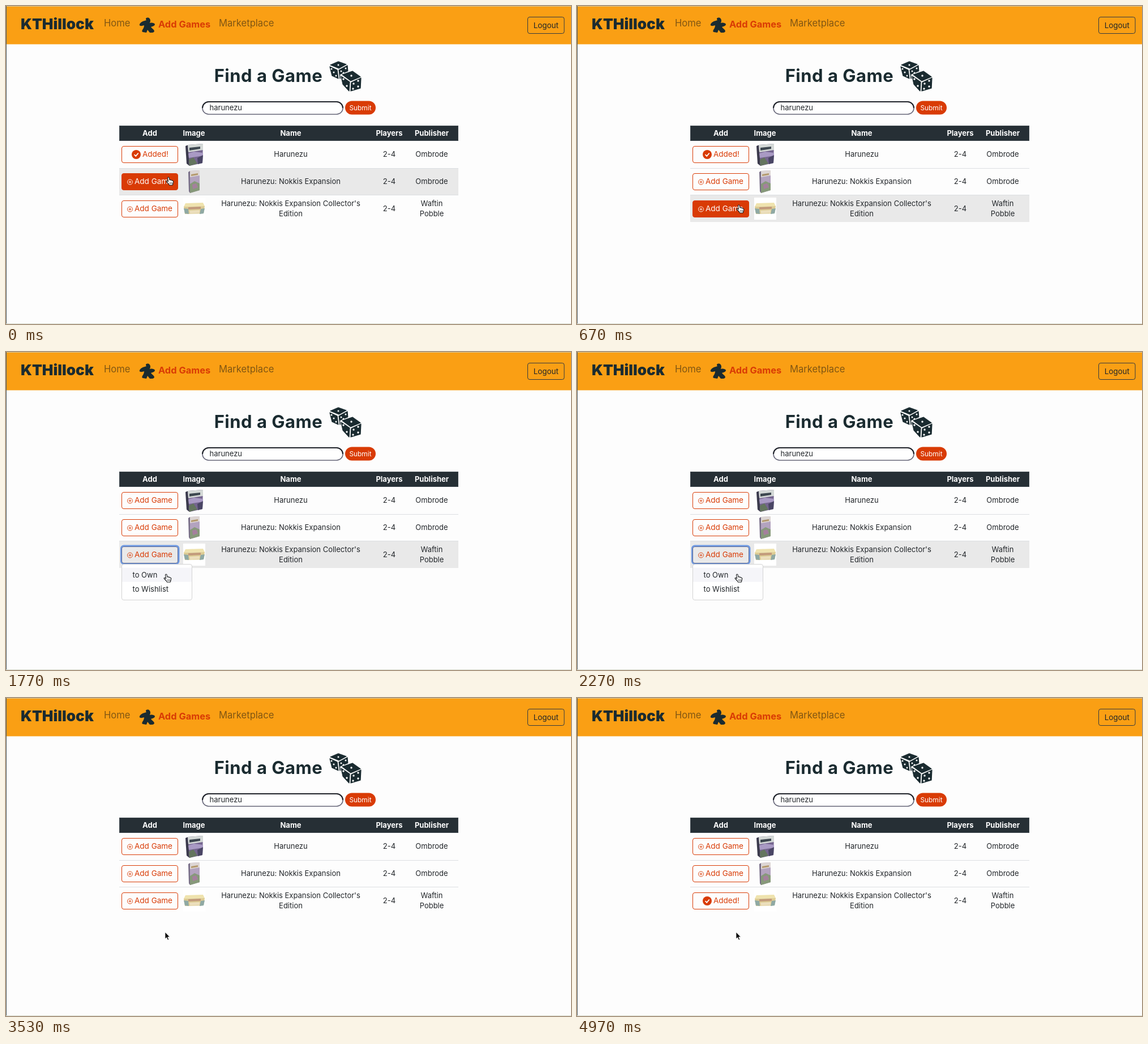
Animation, 998 px wide and 561 px high, one loop 5.01 s. Source, as an HTML page:

```html
<!DOCTYPE html>
<html lang="en">
<head>
<meta charset="utf-8">
<title>Find a Game</title>
<style>
  html, body { margin: 0; width: 100%; height: 100%; overflow: hidden; background: #fdfdfd; }
  svg { display: block; width: 998px; height: 561px; font: 13px Inter, sans-serif; fill: #212529; }
  .mid { text-anchor: middle; }
  .head { font-weight: 700; fill: #fff; }
  .nav { font-size: 16.6px; fill: #805613; }
</style>
</head>
<body>
<svg id="stage" viewBox="0 0 998 561" xmlns="http://www.w3.org/2000/svg"></svg>
<script>
const LOOP = 5010;
const RED = '#d93b05', DARK = '#1a2b30';
const stage = document.getElementById('stage');

const text = (x, y, s, attrs = '') => `<text x="${x}" y="${y}" ${attrs}>${s}</text>`;
const mid = (x, y, s, cls = '', attrs = '') => text(x, y, s, `class="mid ${cls}" ${attrs}`);
const rect = (x, y, w, h, attrs = '') =>
  `<rect x="${x}" y="${y}" width="${w}" height="${h}" ${attrs}/>`;
const path = (d, attrs = '') => `<path d="${d}" ${attrs}/>`;
const dots = (points, r) =>
  points.map(([x, y]) => `<circle cx="${x}" cy="${y}" r="${r}" fill="#fdfdfd"/>`).join('');

const rows = [
  { top: 238, bottom: 286, button: 247, name: ['Harunezu'], maker: ['Ombrode'] },
  { top: 287, bottom: 333, button: 295, name: ['Harunezu: Nokkis Expansion'], maker: ['Ombrode'] },
  { top: 334, bottom: 381, button: 343,
    name: ["Harunezu: Nokkis Expansion Collector's", 'Edition'], maker: ['Waftin', 'Pobble'] }
];

function navbar() {
  return rect(0, 0, 998, 67.5, 'fill="#fa9f14"') +
    text(26, 41, 'KTHillock', `font-size="26.2" font-weight="900" fill="${DARK}"`) +
    path('M247 22c3-3 8-1 8 4 0 2-1 3-1 4 4-1 8 0 9 2 0 3-4 4-7 5 2 3 5 4 6 7 0 2-2 3-4 3h-4l-4-5-2 5-6-1c-2 0-2-2-1-4 2-3 3-5 3-8-3 1-7 2-8 0-1-3 4-7 9-8l3-1c-1-1-1-2-1-3z', `fill="${DARK}"`) +
    text(269, 38, 'Add Games', `font-size="16.4" font-weight="700" fill="${RED}"`) +
    text(376, 36, 'Marketplace', 'class="nav"') +
    text(173, 36, 'Home', 'class="nav"') +
    rect(921.5, 19.5, 64.5, 29, 'rx="3.5" fill="none" stroke="#343a40"') +
    mid(953.8, 38.5, 'Logout', '', 'font-size="13.4"');
}

function dice() {
  const solid = `fill="${DARK}" stroke="${DARK}" stroke-width="1.2" stroke-linejoin="round"`;
  return path('M573 104l14-6 14 5-13 7zM572 107l13 6 2 15-11-5zM588 113l15-8 1 12-14 11z', solid) +
    dots([[587, 104], [575, 111], [579, 117], [583, 123], [592, 115], [600, 110], [596, 118]], 1.5) +
    path('M590 121l22-9 18 13-2 21-21 7-14-14z', 'fill="#fdfdfd"') +
    path('M594 121l18-6 14 10-17 7zM592 124l15 10-1 16-11-12zM610 135l17-8-1 18-17 5z', solid) +
    dots([[610, 123], [596, 129], [602, 141], [614, 137], [622, 132], [613, 146], [622, 142]], 1.7);
}

function search() {
  return mid(463.5, 133.5, 'Find a Game', '',
      `font-size="31" font-weight="700" letter-spacing=".5" fill="${DARK}"`) + dice() +
    rect(347, 169, 248, 22, 'rx="11" fill="#fff" stroke="#67677a" stroke-width="1.6"') +
    path('M347 180a11 11 0 0 1 11-11h226a11 11 0 0 1 11 11', 'fill="none" stroke="#20232a" stroke-width="2"') +
    text(359.5, 184, 'harunezu') +
    rect(599, 167.5, 54, 24, `rx="12" fill="${RED}"`) +
    mid(626, 183.5, 'Submit', '', 'font-size="11.9" fill="#fff"');
}

const boxes = [
  path('M317 247l5-2 2 37-5-4z', 'fill="#3b3a4c"') +
    path('M321 245l27-2-1 34-23 5z', 'fill="#75658f"') +
    path('M321 245l27-2v11l-26 4z', 'fill="#d3d8d6"') +
    path('M324 250l19-2v4l-19 3z', 'fill="#3d4750"') +
    path('M322 260l10-3 16 2v5l-25 4z', 'fill="#a99ac4"') +
    path('M323 271l8-4 7 11-14 4z', 'fill="#64755f"') +
    path('M338 268l10-5-1 14-8 2z', 'fill="#4a4665"'),
  path('M322 293l3-2v39l-2-3z', 'fill="#776d87"') +
    path('M325 291l17-1v35l-17 5z', 'fill="#b3a3bf"') +
    path('M325 291l17-1v9l-17 3z', 'fill="#ddd6d4"') +
    path('M327 297l12-2v3l-12 2z', 'fill="#b4996d"') +
    path('M325 314l8-5 9 4v12l-17 5z', 'fill="#87997a"') +
    path('M329 315l7-2 3 7-9 3z', 'fill="#a5809d"'),
  path('M317 348l31-1 3 6-37 1z', 'fill="#efe3ae"') +
    path('M314 354l37-1-2 13-33 1z', 'fill="#dccb93"') +
    path('M314 357l8 1 1 9-7-1zM351 357l-7 1-2 9 7-1z', 'fill="#8fa9a4"') +
    path('M322 355l22-1v4l-22 1z', 'fill="#c29a7c"') +
    path('M324 361l18-1v5l-17 1z', 'fill="#ecdfbd"')
];

function table() {
  const heads = [[254, 'Add'], [332, 'Image'], [503, 'Name'], [677, 'Players'], [752, 'Publisher']];
  const lines = (x, list, center) =>
    list.map((s, i) => mid(x, center + (i - (list.length - 1) / 2) * 18.6, s)).join('');
  return rect(200.5, 211.5, 598, 26, 'fill="#262f35" stroke="#40494f"') +
    heads.map(([x, s]) => mid(x, 228.5, s, 'head')).join('') +
    rows.map((r, i) => {
      const base = r.button + 19;
      return rect(200, r.top, 599, r.bottom - r.top, `id="row${i}" fill="#e9e9e9"`) +
        (i ? rect(200, r.top - 1, 599, 1, 'fill="#dcdfe2"') : '') +
        (i === 2 ? rect(313, 338, 39, 39, 'fill="#fff"') : '') + boxes[i] +
        lines(503, r.name, base) + mid(677, base, '2-4') + lines(752, r.maker, base) +
        `<g id="button${i}"></g>`;
    }).join('');
}

function menu() {
  return `<g id="menu">` +
    rect(204.5, 374.5, 124, 63, 'rx="3.5" fill="#fff" stroke="#d3d3d3"') +
    rect(205, 380.5, 123, 25, 'id="own" fill="#f5f5f9"') +
    rect(205, 405.5, 123, 25, 'id="wish" fill="#f5f5f9"') +
    text(223.5, 397.5, 'to Own') + text(223.5, 422.5, 'to Wishlist') + '</g>';
}

function cursors() {
  const hand = 'M-.5 1.5C-.5-.5 2-.5 2.2 1.5L3 5c1-.8 2.3-.4 2.5.5C6.5 4.900 7.700 5.300 7.900 6.300 9 6 9.800 6.700 9.700 8L9 11.500 8 14H2.500L1 11.500-2.500 8C-3.500 6.500-1.800 5.700-.8 6.700L.5 7.700z';
  return `<g id="hand">${path(hand, 'fill="#fff" stroke="#15181c" stroke-width="1.1" stroke-linejoin="round"')}` +
    path('M3.500 9v3M5.500 9v3M7.500 9v3', 'stroke="#15181c" stroke-width=".7"') + '</g>' +
    `<g id="arrow">${path('M0 0v12l2.700-2.500 2 4.600 2-.9-2-4.400h3.700z', 'fill="#000" stroke="#fff" stroke-width=".8"')}</g>`;
}

stage.innerHTML = rect(0, 0, 998, 561, 'fill="#fdfdfd"') + navbar() + search() + table() + menu() +
  rect(0, 0, 998, 1, 'fill="#d8c79a"') + rect(0, 0, 1, 561, 'fill="#4b5b60"') +
  rect(0, 560, 998, 1, 'fill="#d9dccf"') + cursors();

const el = id => document.getElementById(id);
const show = (id, on) => el(id).setAttribute('visibility', on ? 'visible' : 'hidden');

function button(y, added, filled, focused) {
  const ink = filled ? '#fff' : RED;
  const icon = added
    ? `<circle cx="230" cy="${y + 15}" r="8" fill="${ink}"/>` +
      path(`M226.500 ${y + 15}l2.700 2.800 4.500-5.300`, `fill="none" stroke="${filled ? RED : '#fff'}" stroke-width="1.8"`)
    : `<circle cx="219" cy="${y + 15.5}" r="4.5" fill="none" stroke="${ink}" stroke-width=".9"/>` +
      path(`M216.500 ${y + 15.5}h5M219 ${y + 13}v5`, `stroke="${ink}" stroke-width=".9"`);
  return (focused ? rect(203.5, y - 1, 101.5, 31.5, 'rx="4.5" fill="none" stroke="#6f9ae3" stroke-width="3"') : '') +
    rect(204.5, y + .5, 99, 29, `rx="3.5" fill="${filled ? RED : focused ? '#e9e9e9' : '#fdfdfd'}" stroke="${focused && !filled ? '#5c6a94' : RED}"`) +
    icon + text(added ? 241 : 227, y + 19, added ? 'Added!' : 'Add Game', `font-size="13.5" fill="${ink}"`);
}

// time, x, y of the pointer's hot spot
const track = [
  [0, 286, 302], [120, 286, 302], [440, 285, 351], [1100, 285, 351], [1250, 285, 353],
  [1400, 285, 353], [1680, 282, 392], [2270, 282, 392], [2560, 281, 413], [LOOP, 281, 413]
];

function pointerAt(t) {
  const i = track.findIndex((k, n) => n && t <= k[0]);
  const [a, b] = [track[i - 1], track[i]];
  const u = (t - a[0]) / (b[0] - a[0]), e = u * u * (3 - 2 * u);
  return [a[1] + (b[1] - a[1]) * e, a[2] + (b[2] - a[2]) * e];
}

function draw(t) {
  const [x, y] = pointerAt(t);
  const open = t >= 1200 && t < 3320;
  const own = open && y >= 380 && y < 405;
  const wish = open && y >= 405;
  let clickable = own || wish;

  rows.forEach((r, i) => {
    const over = y >= r.top && y < r.bottom || i === 2 && open;
    const filled = y >= r.button && y < r.button + 30;
    const added = i === 0 ? t < 1000 : i === 2 && t >= 3830;
    clickable = clickable || filled;
    show('row' + i, over);
    el('button' + i).innerHTML = button(r.button, added, filled, i === 2 && open);
  });

  show('menu', open);
  show('own', own);
  show('wish', wish);
  show('hand', clickable);
  show('arrow', !clickable);
  for (const id of ['hand', 'arrow'])
    el(id).setAttribute('transform', `translate(${x.toFixed(1)} ${y.toFixed(1)})`);
}

const start = performance.now();
function tick() {
  draw((performance.now() - start) % LOOP);
  requestAnimationFrame(tick);
}
tick();
</script>
</body>
</html>
```
